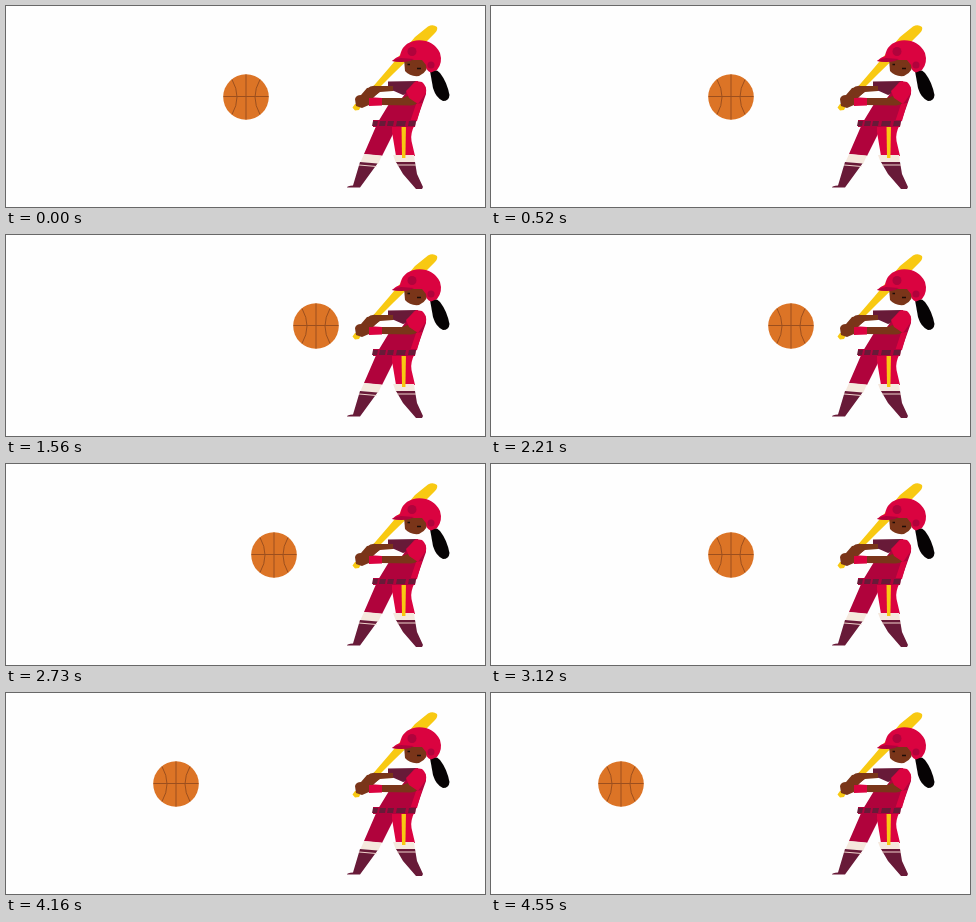
Animation, 479 px wide and 201 px high, one loop 4.68 s. Source, as an HTML page:

```html
<!DOCTYPE html>
<html lang="en">
<head>
<meta charset="utf-8">
<title>Batter and ball</title>
<style>
  html, body { margin: 0; width: 100%; height: 100%; overflow: hidden; background: #fefefe; }
  svg { display: block; width: 100%; height: 100%; }
  .red { fill: #da0340; }
  .crimson { fill: #b0033c; }
  .plum { fill: #681a38; }
  .skin { fill: #7a3519; }
  .gold { fill: #f8c912; }
  .cream { fill: #f5e8dd; }
</style>
</head>
<body>
<svg viewBox="0 0 479 201">
  <g id="batter">
    <!-- bat -->
    <path class="gold" d="M346.5 101.5 L349 98 L352 98 L383 62 L409 31 L422 20.5 Q427 18 431 21 Q432 24 429 27 L420 36 L388 67 L355 100 L353 104 L349 104.5 Z"/>

    <!-- far arm -->
    <path class="plum" d="M382 75.5 L412 75 L408 86 L397 89 L388 85 L382 84 Z"/>
    <path class="skin" d="M361 83 Q365 79 370 80 L387 80 L387 85 L374 86 L366 92 L360 91 Z"/>

    <!-- legs -->
    <path class="crimson" d="M371 118 L394 118 L388 126 L376 150 L358 148 Z"/>
    <path class="red" d="M386 118 L409 118 Q404 128 405.5 135 L409 150 L390 150 L386 126 Z"/>
    <path class="cream" d="M358 148 L376 149.5 L372 158 L354.5 156 Z"/>
    <path class="cream" d="M387 149 L408 149 L409 157 L390 157 Z"/>
    <path class="plum" d="M354 156 L371.5 157.5 L354 181.5 L341 181.5 Q341 180 347 179.5 Z"/>
    <path class="plum" d="M390 156 L409 156 L411 168 L417 181 L416 183 L410 183 L397 168 Z"/>
    <path d="M353 159 L370.5 160.5 M391 159 L410 159" stroke="#f0d4cc" fill="none"/>
    <path class="gold" d="M395.5 119 H400 L399.4 152 H396 Z"/>

    <!-- shirt -->
    <path class="crimson" d="M408 76 L414 76 Q421 79 420 88 L410 116 L372 116 L383 98 L396 92 Z"/>
    <path class="red" d="M410 98 L416 97 L411 115 L404 116 Z"/>
    <path class="crimson" d="M367 114 L410 114 L409 121 L367 121 Z"/>
    <path class="plum" d="M367 115 h5 l-1 5 h-5 Z M374 115 h6 l-1 5 h-6 Z M382 115 h6 l-1 5 h-6 Z M391 115 h9 l-1 5 h-9 Z M403 115 h7 l-1 5 h-7 Z"/>

    <!-- near arm and hands -->
    <path class="skin" d="M374 92 L396 92 L405 89 L412 95 Q411 99 405 99.5 L375 99 Z"/>
    <path class="red" d="M400 85 L410 75 L416 76 Q421 80 420 87 L412 98 L403 92 Z"/>
    <path class="red" d="M362 91 L376 92 L376 99.5 L363 100 Z"/>
    <path class="skin" d="M349 93 Q350 89 355 89 L361 82 L369 81 L374 85 L367 92 L363 92 L363 99 L356 102 L350 100 Z"/>

    <!-- head -->
    <path d="M424 65 Q430 62 434 67 Q441 76 443.5 89 Q443 95 437 95 Q430 92 427 82 Z" fill="#060304"/>
    <path class="skin" d="M398 53 L422 53 Q423 66 413 70 Q404 71 399 65 Z"/>
    <path class="red" d="M386 55 Q390 51 394 50 Q396 37 410 34.5 Q427 33 434 47 Q437 57 431 64 L425 66.5 Q420 65 420 59 L416 54 L404 54 Q396 57 386 55 Z"/>
    <path class="crimson" d="M386 55 Q391 52.5 395 52 L408 53 L404 55 Q396 57 386 55 Z"/>
    <circle class="crimson" cx="406" cy="45.5" r="4.5"/>
    <circle class="crimson" cx="425" cy="59" r="3.5"/>
    <path d="M401.5 58.5 H404 M411 62.5 H415" stroke="#1c0c08" stroke-width="1.5"/>
  </g>

  <g id="ball" fill="none" stroke="#9c4f1e" stroke-width="1">
    <circle r="22.8" fill="#dc7426" stroke="none"/>
    <path d="M-22.5 -.5 H22.5 M0 -22.5 V22.5 M-14 -17.5 Q-4 0 -14 17.5 M14 -17.5 Q4 0 14 17.5"/>
  </g>
</svg>
<script>
  const STEP = 130, STEPS = 36;
  // [step, x] turning points of the ball's path
  const path = [[0, 240], [5, 240], [14, 330], [17, 300], [22, 260], [28, 200], [32, 170], [35, 130]];
  const ball = document.getElementById("ball");

  function ballX(step) {
    const i = Math.max(1, path.findIndex(([s]) => s >= step));
    const [s0, x0] = path[i - 1], [s1, x1] = path[i];
    return Math.round(x0 + (x1 - x0) * (step - s0) / (s1 - s0));
  }

  function draw() {
    const step = Math.floor(performance.now() / STEP) % STEPS;
    ball.setAttribute("transform", `translate(${ballX(step)} 91)`);
    requestAnimationFrame(draw);
  }
  draw();
</script>
</body>
</html>
```
